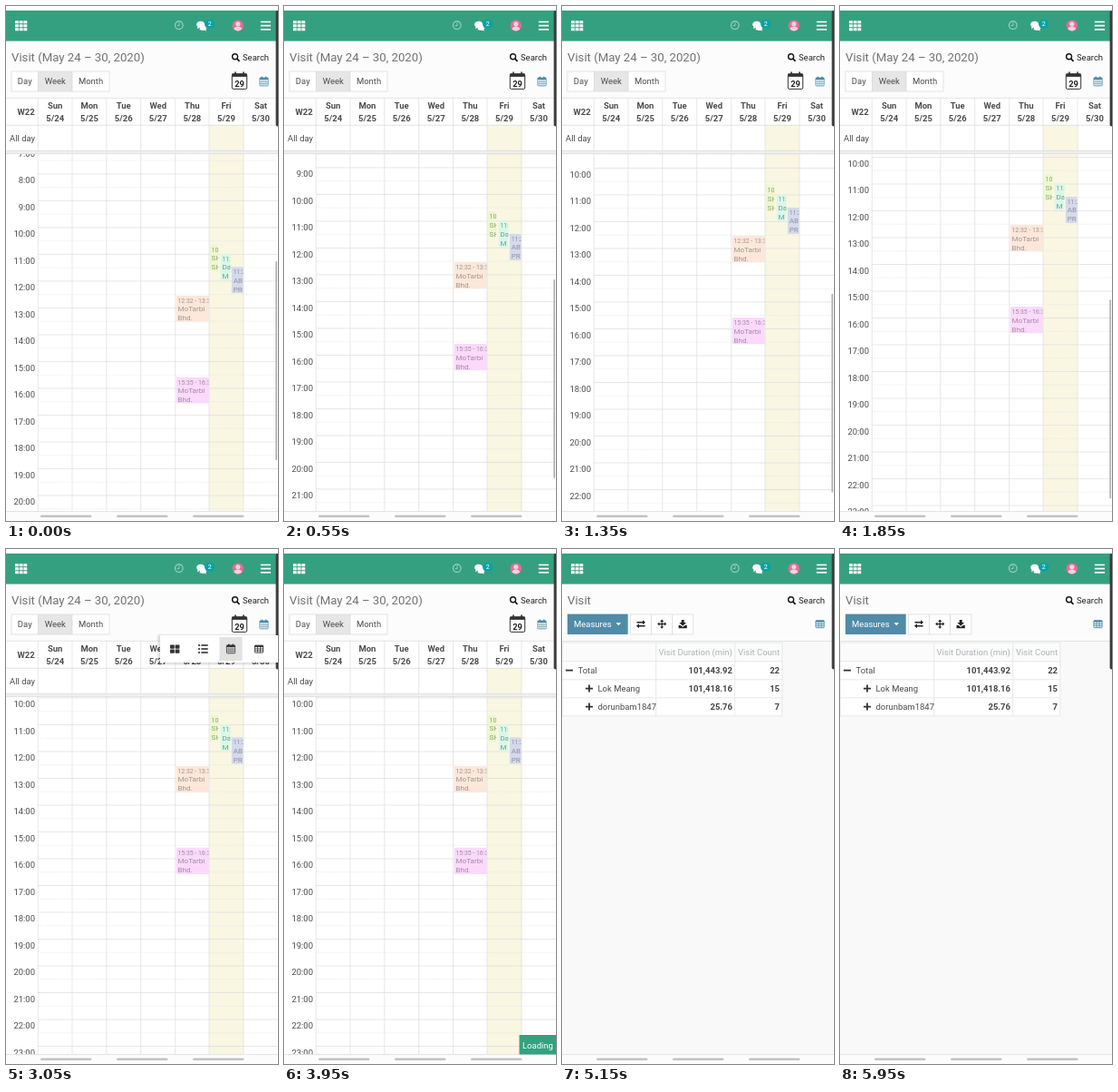
Animation of 300x567 px, one loop 6 s. Source, as an HTML page:

```html
<!DOCTYPE html>
<html lang="en">
<head>
<meta charset="utf-8">
<title>Visit calendar</title>
<style>
html, body { margin: 0; width: 100%; height: 100%; overflow: hidden; background: #fff; }
svg { display: block; }
text { font-family: Roboto, Arial, sans-serif; white-space: pre; }
</style>
</head>
<body>
<svg id="stage" width="300" height="567" viewBox="0 0 300 567"></svg>
<script>
const NS = 'http://www.w3.org/2000/svg';
const LOOP = 6000;
const HOUR = 29.5;
const SIZE = 9.47;
const INK = '#4c4c4c';
const stage = document.getElementById('stage');

function el(parent, tag, attrs = {}) {
  const node = document.createElementNS(NS, tag);
  for (const key in attrs) node.setAttribute(key, attrs[key]);
  return parent.appendChild(node);
}
const group = (parent, attrs) => el(parent, 'g', attrs);
const rect = (p, x, y, width, height, fill, more) =>
  el(p, 'rect', { x, y, width, height, fill, ...more });
const circle = (p, cx, cy, r, fill, more) => el(p, 'circle', { cx, cy, r, fill, ...more });
const path = (p, d, fill, more) => el(p, 'path', { d, fill, ...more });
const line = (p, d, stroke, width = 1, more) =>
  path(p, d, 'none', { stroke, 'stroke-width': width, ...more });
function text(p, x, y, str, fill = INK, more) {
  el(p, 'text', { x, y, fill, 'font-size': SIZE, ...more }).textContent = str;
}
const middle = { 'text-anchor': 'middle' };
const end = { 'text-anchor': 'end' };
const bold = { 'font-weight': 700 };

function calendarIcon(p, cx, cy, color) {
  const g = group(p, { transform: `translate(${cx - 5} ${cy - 5.3})` });
  rect(g, 0.4, 1.6, 9.2, 8.8, 'none', { stroke: color, 'stroke-width': 0.8, rx: 0.6 });
  rect(g, 0.4, 1.4, 9.2, 2.2, color);
  rect(g, 2, 0, 1.5, 2.6, color, { rx: 0.6 });
  rect(g, 6.5, 0, 1.5, 2.6, color, { rx: 0.6 });
  line(g, 'M.5 5.8H9.5M.5 8H9.5M2.8 3.5V10M5 3.5V10M7.2 3.5V10', color, 0.5);
}

function tableIcon(p, cx, cy, color) {
  const g = group(p, { transform: `translate(${cx - 5} ${cy - 4.3})` });
  rect(g, 0.4, 0.4, 9.2, 8, 'none', { stroke: color, 'stroke-width': 0.9, rx: 0.7 });
  rect(g, 0.4, 0.4, 9.2, 1.9, color);
  line(g, 'M.5 4.2H9.5M.5 6.3H9.5M3.5 2V8M6.5 2V8', color, 0.8);
}

function button(p, x, width, label, fill = '#fff') {
  rect(p, x, 72, width, 22, fill, { stroke: '#dcdcdc', 'stroke-width': 0.8 });
  if (label) text(p, x + width / 2, 86.3, label, INK, middle);
}

function drawCalendar(p) {
  const cols = [35.3, 73, 110.8, 148.7, 186.7, 224, 262, 300];
  const border = '#dedede';
  rect(p, 0, 38.5, 300, 518, '#fcfcfc');
  text(p, 6, 61, 'Visit (May 24 – 30, 2020)', '#727272', { 'font-size': 13.2 });
  button(p, 6, 29.5, 'Day');
  button(p, 35.5, 37.5, 'Week', '#e6e6e6');
  button(p, 73, 41, 'Month');

  // Today button
  rect(p, 249.3, 74.8, 16.4, 16.6, '#fff', { stroke: '#333', 'stroke-width': 1, rx: 1.5 });
  rect(p, 249.3, 74.5, 16.4, 3.4, '#333');
  line(p, 'M253 72.5V76M262 72.5V76', '#333', 1.7);
  text(p, 257.5, 88.6, '29', '#222', { ...middle, ...bold, 'font-size': 9.3 });
  calendarIcon(p, 284.5, 82.8, '#4b8aa8');

  // Time grid
  rect(p, 0, 101, 300, 455.5, '#fff');
  rect(p, 224, 131, 38, 425, '#f9f6e2');
  const view = el(p, 'svg', { x: 0, y: 163, width: 300, height: 393.5 });
  const body = group(view);
  const top = h => 22 + (h - 8) * HOUR;
  for (let h = 6; h < 24; h++) {
    const y = top(h);
    line(body, `M35 ${y}H300`, '#dddddd', 0.7);
    line(body, `M35 ${y + HOUR / 2}H300`, '#dedede', 0.6, { 'stroke-dasharray': '0.8 0.8' });
    text(body, 32, y + 10.4, h + ':00', INK, end);
  }
  line(p, cols.slice(0, 7).map(x => `M${x} 101V556.5`).join(''), border, 0.7);

  const events = group(view);
  function event(x, width, hour, fill, ink, time, lines) {
    const box = el(events, 'svg', { x, y: top(hour), width, height: 29.3 });
    rect(box, 0, 0, width, 29.3, fill, { rx: 1.5 });
    text(box, 2, 8, time, ink, { 'font-size': 6.9 });
    lines.forEach((str, i) => text(box, 2, 17.6 + i * 10, str, ink, { 'font-size': 8.1 }));
  }
  event(187.5, 36.3, 12.53, '#fce7da', '#a2958c', '12:32 - 13:32', ['MoTarbi', 'Bhd.']);
  event(187.5, 36.3, 15.58, '#fbd9fb', '#a08ca2', '15:35 - 16:35', ['MoTarbi', 'Bhd.']);
  event(224.6, 9.8, 10.63, '#edf7cf', '#8ca568', '10:38', ['SH', 'SH']);
  event(236.5, 11, 10.98, '#d9f7e9', '#5ea494', '11:00', ['Da', 'M']);
  event(248.7, 13, 11.47, '#d5d9ea', '#8e92aa', '11:28', ['AB', 'PR']);

  // Column heads and all-day row
  line(p, 'M0 101.3H300M0 131.3H300', border, 0.8);
  rect(p, 0, 159.3, 300, 3.2, '#efefef');
  line(p, 'M0 159.3H300M0 162.6H300', '#d8d8d8', 0.7);
  text(p, 22, 120, 'W22', INK, { ...middle, ...bold });
  text(p, 4, 149.2, 'All day');
  ['Sun', 'Mon', 'Tue', 'Wed', 'Thu', 'Fri', 'Sat'].forEach((day, i) => {
    const x = (cols[i] + cols[i + 1]) / 2;
    text(p, x, 112.6, day, INK, { ...middle, ...bold });
    text(p, x, 127.2, '5/' + (24 + i), INK, { ...middle, ...bold });
  });
  const thumb = rect(p, 297.2, 281, 1.9, 219, '#b7b7b7', { rx: 0.9 });
  return { body, events, thumb };
}

function drawMenu(p) {
  const ink = '#333';
  for (let i = 4; i > 0; i--) {
    rect(p, 170 - i, 95.5 - i / 2, 140, 29.5 + i * 1.4, '#000', { opacity: 0.035, rx: 2 });
  }
  rect(p, 170, 95, 132, 30, '#fff');
  rect(p, 235.5, 97, 25, 26, '#e2e2e2');
  for (const x of [181, 186.6]) {
    for (const y of [105.4, 110.4]) rect(p, x, y, 4.8, 4.3, ink, { rx: 0.6 });
  }
  for (const y of [106, 110, 114]) {
    circle(p, 213, y, 1.1, ink);
    rect(p, 215.3, y - 0.8, 7.4, 1.6, ink);
  }
  calendarIcon(p, 248, 109.7, ink);
  tableIcon(p, 279, 110, ink);
}

function drawPivot(p) {
  const border = '#e2e2e2';
  rect(p, 0, 38.5, 300, 518, '#f9f9f9');
  rect(p, 0, 38.5, 300, 63, '#fcfcfc');
  line(p, 'M0 101.5H300', '#dedede', 0.8);
  text(p, 6, 61, 'Visit', '#727272', { 'font-size': 13.2 });
  rect(p, 6, 71.6, 66.7, 22.4, '#508ba8');
  text(p, 13, 86.3, 'Measures', '#fff');
  path(p, 'M59.5 81.3h5.6l-2.8 3z', '#fff');
  for (const x of [75.6, 98.6, 121.8]) button(p, x, 23);

  const ink = '#222';
  line(p, 'M82.5 80.8H90M84 84.8H91.6', ink, 1.4);
  path(p, 'M89 78.3l3 2.5-3 2.5zM85 82.3l-3 2.5 3 2.5z', ink);
  line(p, 'M106.5 82.6H114M110.2 79V86.4', ink, 1.2);
  path(p, 'M110.2 77.6l2 2.3h-4zM110.2 87.8l2-2.3h-4zM105.2 82.6l2.3-2v4zM115.3 82.6l-2.3-2v4z', ink);
  path(p, 'M131.7 78h3v3h2.3l-3.8 3.8-3.8-3.8h2.3z', ink);
  path(p, 'M128.6 84h2l2.6 2 2.6-2h2v3.2h-9.2z', ink);
  tableIcon(p, 284.5, 82.6, '#4b8aa8');

  rect(p, 0, 102, 243, 82, '#fff');
  rect(p, 0, 102, 243, 22, '#fbfbfb');
  line(p, 'M0 103H243M0 123.8H243M0 143.8H243M0 163.8H243M0 183.8H243' +
    'M.4 103V184M103.7 103V184M190.7 103V184M242.8 103V184', border, 0.8);
  text(p, 106.5, 117, 'Visit Duration (min)', '#adb2b9');
  text(p, 194, 117, 'Visit Count', '#adb2b9');
  const rows = [
    ['Total', '101,443.92', '22'],
    ['Lok Meang', '101,418.16', '15'],
    ['dorunbam1847', '25.76', '7'],
  ];
  rows.forEach(([name, minutes, count], i) => {
    const y = 133.6 + i * 20;
    const x = i ? 26 : 4;
    line(p, `M${x} ${y}h8` + (i ? `M30 ${y - 4}v8` : ''), '#333', 1.8);
    text(p, i ? 39.5 : 17.5, y + 3.6, name);
    text(p, 188, y + 3.6, minutes, '#444', { ...end, ...bold });
    text(p, 240, y + 3.6, count, '#444', { ...end, ...bold });
  });
}

function drawChrome(p) {
  rect(p, 0, 0, 300, 5, '#fff');
  rect(p, 0, 5, 300, 33.6, '#35a07f');
  for (let i = 0; i < 9; i++) {
    rect(p, 10 + (i % 3) * 4.7, 16.2 + Math.floor(i / 3) * 4, 3.9, 3.1, '#fff', { rx: 0.4 });
  }
  circle(p, 190.8, 21.2, 4.3, 'none', { stroke: '#a5d4c5', 'stroke-width': 1.1 });
  line(p, 'M191 18.5V21.6H188.7', '#a5d4c5', 0.9);
  path(p, 'M216 20c4 0 5.5 2 5.5 3.6 0 1-.6 1.8-1.3 2.4l.9 1.5-2.7-.7c-2 .3-3.8-.2-5-1z', '#fff');
  el(p, 'ellipse', { cx: 214.7, cy: 20.3, rx: 4.6, ry: 3.6, fill: '#fff' });
  path(p, 'M211.6 22l-.6 3.2 3.2-1.8z', '#fff');
  rect(p, 219, 15, 11.4, 9.6, '#06a3a3', { rx: 4.8 });
  text(p, 224.7, 22.3, '2', '#fff', { ...middle, 'font-size': 7.2 });
  circle(p, 255.8, 21.6, 6.2, '#e66a9a');
  circle(p, 255.8, 19.8, 2.6, '#f3d3dc');
  path(p, 'M251.4 25.6c.5-4 8.3-4 8.8 0a6.2 6.2 0 0 1-8.8 0z', '#f3d3dc');
  line(p, 'M280.8 17.5H292M280.8 21.7H292M280.8 25.9H292', '#fff', 1.7);
  circle(p, 252.6, 55.8, 3, 'none', { stroke: '#111', 'stroke-width': 1.4 });
  line(p, 'M254.8 58.1L257.5 60.8', '#111', 1.8);
  text(p, 261, 59.8, 'Search', '#222');
  rect(p, 297.6, 5, 5, 127.5, '#3a3a3a', { rx: 2 });
  rect(p, 0, 556.5, 300, 10.5, '#fcfcfc');
  line(p, 'M0 556.6H300', '#dcdcdc', 0.8);
  for (const x of [38, 122, 206]) rect(p, x, 560.4, 56.5, 2.6, '#c3c3c3', { rx: 1.3 });
}

rect(stage, 0, 0, 300, 567, '#fff');
const calendar = group(stage);
const grid = drawCalendar(calendar);
const pivot = group(stage);
drawPivot(pivot);
drawChrome(stage);
const menu = group(stage);
drawMenu(menu);
const loading = group(stage);
rect(loading, 259.5, 535, 40.5, 21.5, '#35a07f');
text(loading, 263, 549.5, 'Loading', '#fff');

const clamp = v => Math.min(1, Math.max(0, v));

// Time, offset and speed of the decelerating scroll
const keys = [[0, 0, 0.085], [550, 36.5, 0.05], [1350, 65.5, 0.029], [1850, 77.5, 0.012], [2350, 80, 0]];
function scrollAt(t) {
  const i = keys.findIndex(k => k[0] > t);
  if (i < 0) return 80;
  const [t0, y0, v0] = keys[i - 1];
  const [t1, y1, v1] = keys[i];
  const d = t1 - t0;
  const u = (t - t0) / d;
  const r = 1 - u;
  return r * r * (1 + 2 * u) * y0 + u * r * r * d * v0 +
    u * u * (3 - 2 * u) * y1 - u * u * r * d * v1;
}

const show = (node, on) => node.setAttribute('display', on ? 'inline' : 'none');

function render(t) {
  const y = scrollAt(t);
  const shift = `translate(0 ${-y})`;
  grid.body.setAttribute('transform', shift);
  grid.events.setAttribute('transform', shift);
  grid.thumb.setAttribute('y', 281 + y * 0.545);
  grid.thumb.setAttribute('opacity', 1 - clamp((t - 1860) / 90));
  show(calendar, t < 4250);
  show(pivot, t >= 4250);
  show(menu, t >= 2850 && t < 3600);
  show(loading, t >= 3700 && t < 4800);
  loading.setAttribute('opacity', 1 - clamp((t - 4430) / 370));
}

const start = performance.now();
function tick() {
  render((performance.now() - start) % LOOP);
  requestAnimationFrame(tick);
}
render(0);
requestAnimationFrame(tick);
</script>
</body>
</html>
```
